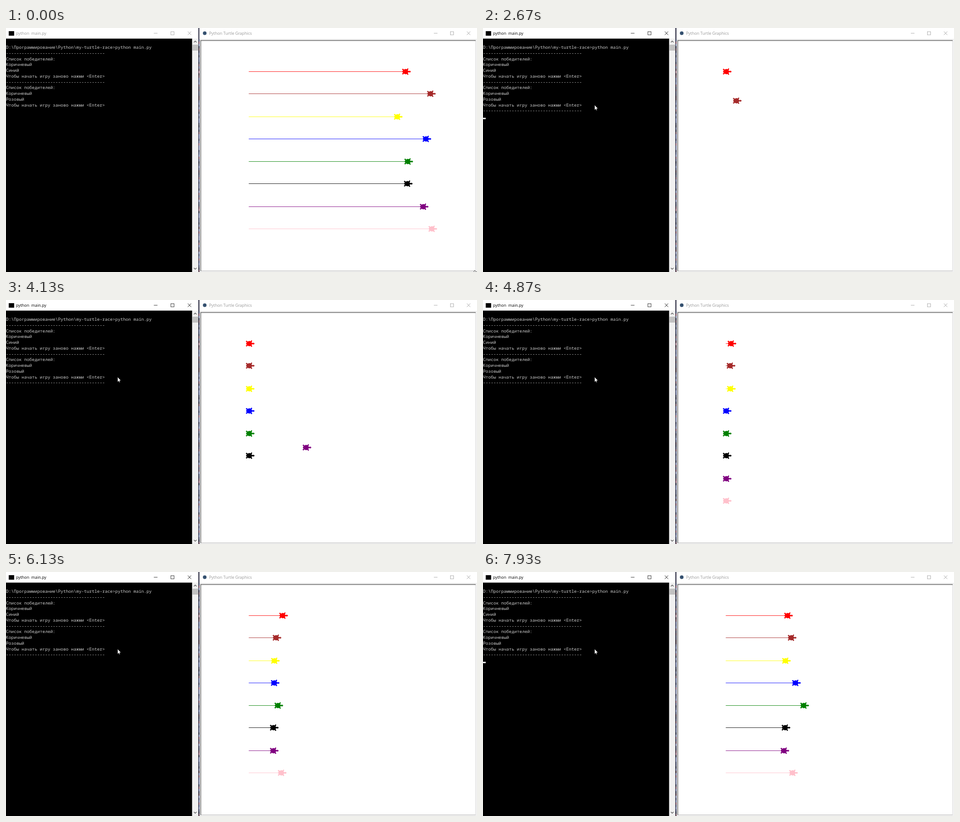
Write an HTML page with a canvas that moves like this. It is 1037 px wide and 540 px high and loops after 8000 ms.

```html
<!DOCTYPE html>
<html lang="ru">
<head>
<meta charset="utf-8">
<title>Turtle race</title>
<style>
html, body { margin: 0; width: 100%; height: 100%; overflow: hidden; background: #fff; }
canvas { display: block; }
</style>
</head>
<body>
<canvas id="stage" width="1037" height="540"></canvas>
<script>
const ctx = document.getElementById('stage').getContext('2d');
const LOOP = 8000, TICK = 200 / 3;
const RESTART = 1930, CLICK = 1070, RACE = 4800, ROUND = 216, MID = 6130, END = 7930;
const HOME = { x: 734.5, y: 285 }, START_X = 534.5, HOP = 30;

// Distance run: in the previous race, and in the new one at MID and at END
const racer = (color, last, mid, end) => ({ color, last, mid, end });
const RACERS = [
  racer('red', 344, 73.5, 135),
  racer('brown', 399, 59, 143),
  racer('yellow', 326, 55.5, 130.5),
  racer('blue', 389, 55, 152.5),
  racer('green', 349, 63, 170.5),
  racer('black', 348, 53, 129.5),
  racer('purple', 383, 53, 127),
  racer('pink', 402, 70.5, 146)
];
const rowY = i => Math.floor(96.5 + 99.7 * (i >> 1) + 49 * (i & 1)) + 0.5;

// Half of the turtle outline as [forward, sideways], mirrored for the other half
const HALF = [[16, 0], [14, 2], [10, 1], [7, 4], [9, 7], [8, 9], [5, 6], [1, 7],
  [-3, 5], [-6, 8], [-8, 6], [-5, 4], [-7, 0]];
const TURTLE = HALF.concat(HALF.slice(1, -1).reverse().map(([x, y]) => [x, -y]));
const ARROW = [[0, 0], [0, 11], [2.4, 8.8], [3.9, 12], [5.4, 11.4], [4.1, 8.2], [7.2, 8]];

const DASHES = '-'.repeat(38);
const AGAIN = 'Чтобы начать игру заново нажми <Enter>';
const results = (a, b) => [DASHES, 'Список победителей:', a, b, AGAIN];
const LINES = ['D:\\Программирование\\Python\\my-turtle-race>python main.py',
  ...results('Коричневый', 'Синий'), ...results('Коричневый', 'Розовый')];

const random = n => Math.abs(Math.sin(n * 12.9898) * 43758.5453) % 1;

function rect(color, x, y, w, h) {
  ctx.fillStyle = color;
  ctx.fillRect(x, y, w, h);
}

function path(points, x, y, scale = 1) {
  ctx.beginPath();
  for (const [px, py] of points) ctx.lineTo(x + px * scale, y + py * scale);
}

function stroke(color, width, points) {
  path(points, 0, 0);
  ctx.strokeStyle = color;
  ctx.lineWidth = width;
  ctx.stroke();
}

function shape(points, x, y, scale, fill, line, width) {
  path(points, x, y, scale);
  ctx.closePath();
  ctx.fillStyle = fill;
  ctx.strokeStyle = line;
  ctx.lineWidth = width;
  ctx.fill();
  ctx.stroke();
}

function label(text, x, y, color, font) {
  ctx.font = font;
  ctx.fillStyle = color;
  ctx.fillText(text, x, y);
}

function titleBar(text, x, color, min, max, close) {
  label(text, x, 15.4, color, '8.9px "Open Sans", "Noto Sans", sans-serif');
  stroke(color, 0.8, [[min - 4, 11.6], [min + 4, 11.6]]);
  ctx.strokeRect(max - 3.5, 8.1, 7, 7);
  stroke(color, 0.9, [[close - 3.8, 7.8], [close + 3.8, 15.4]]);
  stroke(color, 0.9, [[close + 3.8, 7.8], [close - 3.8, 15.4]]);
}

function turtle(i, x, y) {
  const { color } = RACERS[i];
  shape(TURTLE, x, y, 0.78, color, color, 1);
}

function runner(i, run) {
  const y = rowY(i);
  if (run > 0) stroke(RACERS[i].color, 0.9, [[START_X, y], [START_X + run, y]]);
  turtle(i, START_X + run, y);
}

// Turtles move in turn, one leap per round
const rounds = (i, t) => Math.max(0, Math.floor((t - RACE - i * ROUND / 8) / ROUND) + 1);

function runAt(i, t) {
  const { mid, end } = RACERS[i];
  const n = rounds(i, t), nMid = rounds(i, MID), nEnd = rounds(i, END);
  return n <= nMid ? mid * n / nMid
    : mid + (end - mid) * Math.min(1, (n - nMid) / (nEnd - nMid));
}

// One after another they hop from the centre to their rows
function lineUp(t) {
  let begin = RESTART;
  for (let i = 0; i < RACERS.length && t >= begin; i++) {
    const dx = START_X - HOME.x, dy = rowY(i) - HOME.y;
    const hops = 1 + Math.floor(Math.hypot(dx, dy) / HOP);
    const pace = 40 + i;
    const part = Math.min(1, Math.floor((t - begin) / pace) / hops);
    turtle(i, HOME.x + dx * part, HOME.y + dy * part);
    begin += hops * pace;
  }
}

function drawConsole(t) {
  rect('#fff', 0, 0, 424, 24);
  rect('#000', 6, 7, 12, 10);
  titleBar('python  main.py', 22, t < CLICK ? '#999' : '#000', 329.5, 366.5, 404);
  rect('#000', 0, 23.5, 410, 516.5);

  const lines = t < RESTART ? LINES : [...LINES, DASHES];
  lines.forEach((s, n) => label(s, 0, 46.2 + n * 12.73, '#ccc',
    '9.55px "Noto Sans Mono", "DejaVu Sans Mono", monospace'));

  const lit = Math.floor((t - 1125) / (8 * TICK)) % 2 === 0;
  if (t >= 1130 && t < RESTART && lit) rect('#fff', 218, 173.5, 6, 3);
  if (t >= RESTART && (lit || t < 2200)) rect('#fff', 0, 198.7, 6, 3);

  rect('#f0f0f0', 409.7, 23.5, 14, 516.5);
  rect('#c1c1c1', 410.5, 37, 12.5, 13);
  stroke('#505050', 1.3, [[413.7, 31.8], [416.6, 28.9], [419.5, 31.8]]);
  stroke('#505050', 1.3, [[413.7, 531], [416.6, 533.9], [419.5, 531]]);
}

// Sliver of the desktop between the windows
function drawGap() {
  rect('#1c1c34', 423.6, 0, 2, 540);
  rect('#dcdce0', 425.6, 24, 2, 516);
  for (let y = 25; y < 540; y += 5) {
    const hue = random(y) < 0.7 ? 225 : 345;
    rect(`hsl(${hue} 25% ${15 + 45 * random(y + 1)}%)`, 424.3, y, 1.7, 5);
  }
}

function drawTurtleWindow(t) {
  rect('#fff', 425.5, 0, 611.5, 24);
  ctx.beginPath();
  ctx.arc(437.5, 11.5, 4, 0, 7);
  ctx.fillStyle = '#34506f';
  ctx.fill();
  titleBar('Python Turtle Graphics', 447, '#999', 946, 982, 1018.5);
  rect('#f0f0f0', 427.5, 24, 609.5, 516);
  rect('#a0a0a0', 428, 26.7, 606, 511);
  rect('#555', 428.5, 27.3, 605.5, 510.4);
  rect('#e3e3e3', 429.7, 28.6, 604.3, 509.1);
  rect('#fff', 429.7, 28.6, 603.3, 508);

  if (t < RESTART) RACERS.forEach((r, i) => runner(i, r.last));
  else if (t < RACE) lineUp(t);
  else RACERS.forEach((r, i) => runner(i, runAt(i, t)));
}

function drawPointer(t) {
  if (t < 595) {
    stroke('#333', 1, [[1029.5, 539.5], [1032, 536.5], [1034, 538.5], [1036.5, 540]]);
    return;
  }
  const p = Math.min(1, (t - 540) / (CLICK - 540));
  const ease = p * p * (3 - 2 * p);
  shape(ARROW, 1032 - 786.2 * ease, 537 - 366.6 * ease, 1, '#fff', '#000', 0.5);
}

function draw(now) {
  const t = Math.round(Math.floor((now % LOOP + 4) / TICK) * TICK / 10) * 10;
  drawTurtleWindow(t);
  drawConsole(t);
  drawGap();
  drawPointer(t);
  requestAnimationFrame(draw);
}
requestAnimationFrame(draw);
</script>
</body>
</html>
```
